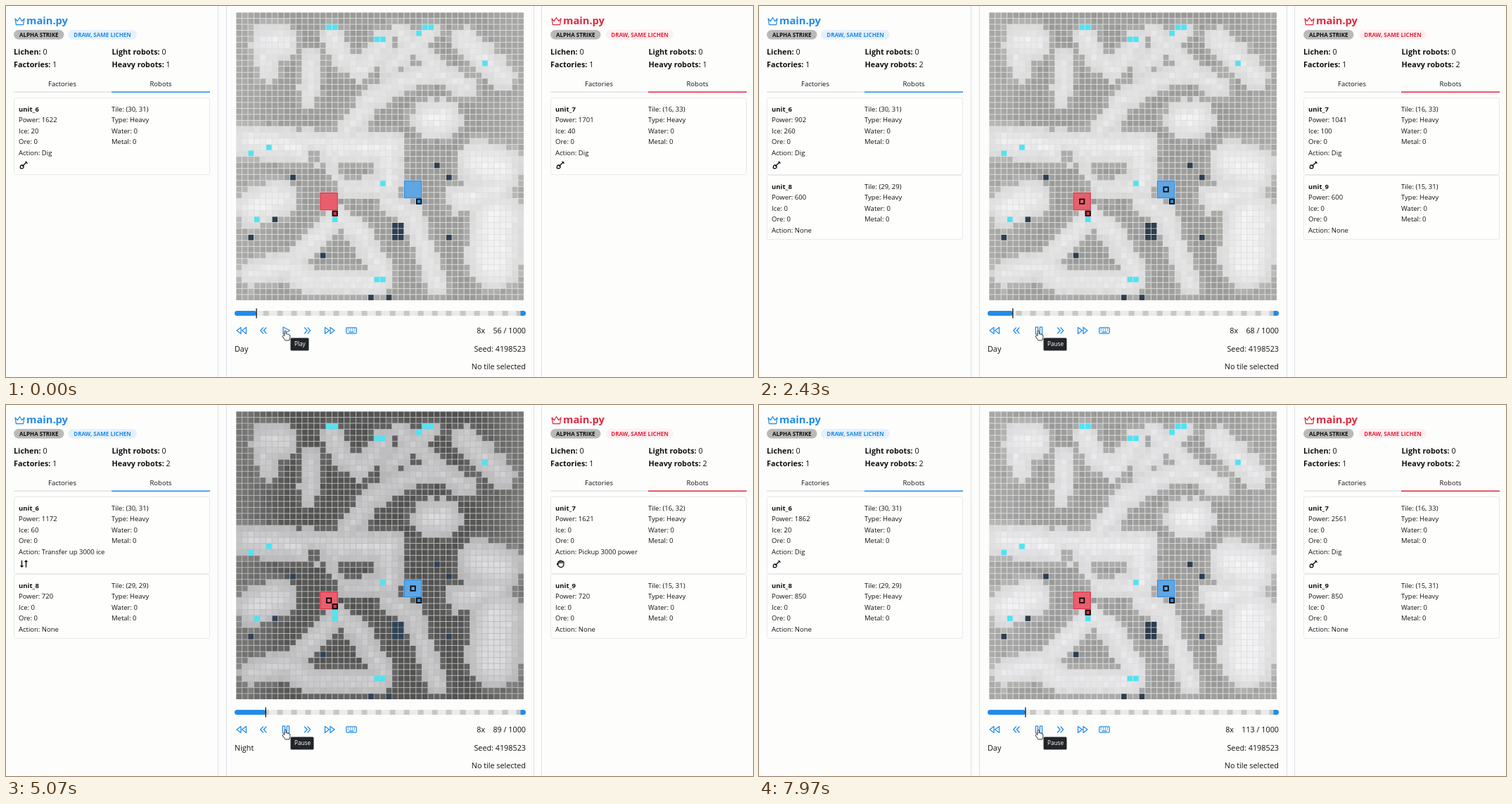
Animation, 1062 px wide and 527 px high, one loop 8000 ms. Source, as an HTML page with a canvas:

```html
<!DOCTYPE html>
<html lang="en">
<head>
<meta charset="utf-8">
<title>Match replay</title>
<style>
html, body { margin: 0; width: 100%; height: 100%; overflow: hidden; background: #fdfdfc; }
#stage { position: absolute; left: 0; top: 0; width: 1062px; height: 527px; overflow: hidden; }
#map, #ui { position: absolute; left: 0; top: 0; }
text { font-family: "Open Sans", "Noto Sans", sans-serif; fill: #111; white-space: pre; }
.t { font-size: 9.5px; }
.s { font-size: 10.8px; }
.b { font-weight: 700; }
.e { text-anchor: end; }
.m { text-anchor: middle; }
.i { fill: none; stroke-width: 1.25; stroke-linecap: round; stroke-linejoin: round; }
</style>
</head>
<body>
<div id="stage">
  <canvas id="map" width="1062" height="527"></canvas>
  <svg id="ui" width="1062" height="527" viewBox="0 0 1062 527"></svg>
</div>
<script>
const LOOP = 8000, START = 1054, STEP_MS = 123, FIRST = 56;
const N = 48, CELL = 8.53, TILE = 7.6, X0 = 327.4, Y0 = 9.4;
const BLUE = '#228be6', RED = '#e0283f';

const SWAP = 'M3 1.5 V10.5 M1.4 8.9 L3 10.5 L4.6 8.9 M9 10.5 V1.5 M7.4 3.1 L9 1.5 L10.6 3.1';
const ACTION = {
  dig: ['Dig', 'M4.2 7.8 L9.8 2.2 M8.4 1.6 L10.6 3.8 M1.2 7.6 Q3 5.6 4.8 7.2 Q6.6 9 4.6 10.8 Q2 11.6 1 11 Q.4 9.4 1.2 7.6Z'],
  down: ['Move down', 'M6 1.5 V10.5 M2.7 7.3 L6 10.5 L9.3 7.3'],
  north: ['Move up', 'M6 10.5 V1.5 M2.7 4.7 L6 1.5 L9.3 4.7'],
  up: ['Transfer up 3000 ice', SWAP],
  center: ['Transfer center 3000 ice', SWAP],
  pick: ['Pickup 3000 power', 'M2.5 6.5 V4 Q2.6 2.5 4 3 Q4.4 1.2 6 2 Q7.5 1.2 8.2 2.8 Q10 2.2 10.4 4 V7.2 Q10 11 6.5 11 Q4 11 2.7 8.8 L1 6.4 Q1.2 5 2.5 6.5 M4.2 3.2 V5 M6.2 2.3 V5 M8.3 3 V5']
};

// Orders: action, repeats, power gained per step
const dig = n => ['dig', n, -60], up = (n, gain = 0) => ['up', n, gain], pick = (n, gain) => ['pick', n, gain];
const north = ['north', 1, 0], down = ['down', 1, 0], center = ['center', 1, 0];

const SIDES = [
  {
    key: 'blue', dx: 0, color: BLUE, fill: '#5fa6e3', pale: '#e5f1fc', unit: 6, base: [29, 29], badge: [88, 98],
    start: { x: 30, y: 31, power: 1622, ice: 20 },
    orders: [dig(16), up(1, -50), north, pick(5, 218), down, dig(5), up(1, -50), dig(3), up(1, -50), dig(7),
      up(1, -50), dig(2), up(1, -50), north, pick(3, 400), center, pick(5, 48), down, dig(9)]
  },
  {
    key: 'red', dx: 763, color: RED, fill: '#e75f6d', pale: '#ffeef0', unit: 7, base: [15, 31], badge: [90, 96],
    start: { x: 16, y: 33, power: 1701, ice: 40 },
    orders: [dig(6), up(1), dig(7), up(2), dig(8), up(1), dig(2), north, up(1), pick(4, 325), pick(5, 86),
      north, up(4), up(2, 100), pick(4, 0), down, pick(5, 62), up(1), down, dig(9)]
  }
];

// Plays the orders once and lists the robot's state at each step
function simulate({ start, orders }) {
  const log = [];
  let u = { ...start };
  for (const [act, count, gain] of orders) {
    for (let i = 0; i < count; i++) {
      log.push({ ...u, act });
      u.power += gain;
      u.y += (act === 'down') - (act === 'north');
      u.ice = act === 'dig' ? u.ice + 20 : 0;
    }
  }
  return log;
}

const ui = document.getElementById('ui');
const put = html => ui.insertAdjacentHTML('beforeend', html);
const label = (x, y, s, cls = 't', more = '') => `<text x="${x}" y="${y}" class="${cls}" ${more}>${s}</text>`;
const slot = (x, y, id, cls = 't') => label(x, y, '', cls, `id="${id}"`);
const rect = (x, y, w, h, fill, more = '') => `<rect x="${x}" y="${y}" width="${w}" height="${h}" fill="${fill}" ${more}/>`;
const icon = (x, y, d, color, more = '') => `<path class="i" transform="translate(${x} ${y})" d="${d}" stroke="${color}" ${more}/>`;
const stat = (x, y, name, val) => label(x, y, `<tspan class="b">${name}:</tspan> ${val}`, 's');
const set = (id, s) => { const el = document.getElementById(id); if (el.textContent !== s) el.textContent = s; };
const show = (id, on) => document.getElementById(id).setAttribute('opacity', +on);

function card(k, n, y, name) {
  const rowY = i => y + 19.5 + i * 15.5;
  const left = ['power', 'ice', 'ore', 'act'].map((r, i) => slot(18, rowY(i + 1), k + n + r));
  const right = ['Type: Heavy', 'Water: 0', 'Metal: 0'].map((s, i) => label(150, rowY(i + 1), s));
  return rect(11.5, y + .5, 278, n ? 91 : 109, '#fefefd', 'rx="2.5" stroke="#e9eaec"') +
    label(18, rowY(0), name, 't b') + slot(150, rowY(0), k + n + 'tile') + left.join('') + right.join('');
}

function panel({ key, dx, color, pale, unit, badge: [bx, bw] }) {
  return `<g transform="translate(${dx} 0)">` +
    icon(12, 15, 'M1 3 L4.3 6.5 L7.5 1.5 L10.7 6.5 L14 3 L12.6 11.5 H2.4Z', color) +
    label(29, 26, 'main.py', 'b', `style="fill:${color};font-size:14.7px"`) +
    rect(11, 34, 71.5, 13.5, '#b9b9b9', 'rx="6.75"') +
    label(46.8, 43.8, 'ALPHA STRIKE', 'b m', 'font-size="8"') +
    rect(bx, 34, bw, 13.5, pale, 'rx="6.75"') +
    label(bx + bw / 2, 43.8, 'DRAW, SAME LICHEN', 'b m', `style="fill:${color};font-size:8px"`) +
    stat(11, 69, 'Lichen', 0) + stat(11, 86.5, 'Factories', 1) + stat(150.5, 69, 'Light robots', 0) +
    stat(150.5, 86.5, 'Heavy robots', `<tspan id="${key}heavy"></tspan>`) +
    label(80, 113.5, 'Factories', 't m') + label(220, 113.5, 'Robots', 't m') +
    rect(11, 121.5, 139, 1.3, '#dcdfe3') + rect(150, 121.5, 140, 1.5, color) +
    card(key, 0, 130, 'unit_' + unit) +
    icon(19.5, 219.5, '', '#000', `id="${key}icon"`) +
    `<g id="${key}extra">${card(key, 1, 240, 'unit_' + (unit + 2))}</g></g>`;
}

function controls() {
  const tri = 'M7 1.5 V10.5 L1 6Z M14.5 1.5 V10.5 L8.5 6Z';
  const chev = 'M4.5 2 L.8 6 L4.5 10 M9 2 L5.3 6 L9 10';
  const flip = (x, d) => `<path class="i" stroke="${BLUE}" transform="translate(${x} 455) scale(-1 1)" d="${d}"/>`;
  let keys = '';
  for (let i = 0; i < 4; i++) keys += `M${3.2 + i * 3} 3.8 h.4 M${3.2 + i * 3} 6 h.4 `;
  return icon(327, 455, tri, BLUE) + icon(361, 455, chev, BLUE) + flip(433.5, chev) + flip(468, tri) +
    icon(393, 455, 'M1 1 L10.5 6 L1 11Z', BLUE, 'id="play"') +
    icon(392.5, 455, 'M.8 1 H4 V11 H.8Z M6.8 1 H10 V11 H6.8Z', BLUE, 'id="pause"') +
    icon(483, 455, `M2 1.8 H14 Q15.2 1.8 15.2 3 V9 Q15.2 10.2 14 10.2 H2 Q.8 10.2 .8 9 V3 Q.8 1.8 2 1.8Z ${keys}M5 8.2 h6`, BLUE) +
    slot(739, 465, 'count', 's e') + slot(325, 491, 'phase', 's') +
    label(739, 491, 'Seed: 4198523', 's e') + label(739, 516, 'No tile selected', 's e');
}

const slideX = step => 333.6 + step * .4;

function slider() {
  let s = rect(325, 433, 414, 7, '#ebecea', 'rx="3.5"');
  for (let n = 30; n < 1000; n += 50) s += rect(slideX(n), 433, 8, 7, '#c6c8c5');
  return s + `<path d="M731.5 433 h4 a3.5 3.5 0 0 1 0 7 h-4z" fill="${BLUE}"/>` +
    rect(325, 433, 30, 7, BLUE, 'id="bar" rx="3.5"') + rect(355, 429.5, 1.3, 14, '#111', 'id="mark"');
}

put([301.5, 313.5, 750.5, 761.5].map(x => rect(x - .5, 0, 1, 527, '#dddeea')).join(''));
put(SIDES.map(panel).join('') + slider() + controls());
put('<path transform="translate(392 460)" fill="#fff" stroke="#333" stroke-width="1" stroke-linejoin="round" ' +
  'd="M4 8.5 V1.8 Q5 .2 6.2 1.8 V6 Q7.4 5 8.2 6.4 Q9.4 5.6 10 7 Q11.6 6.5 11.8 8.2 V11.5 L10.6 15 H5.2 L1.2 9.8 Q1 8 2.6 8Z"/>');
put('<g id="tip">' + rect(404.5, 471.5, 26, 18, '#212529', 'id="tipBox" rx="1.5"') +
  label(410, 483.3, '', '', 'id="tipText" style="fill:#fff;font-size:8.2px"') + '</g>');

// Pale ground as thick strokes: radius, then points in tile units
const PALE = [
  [3, 4.8, 4.5, 7, 4.5], [1.7, 4, 7, 5, 9.5], [1.7, 12, 7.5, 11.6, 13.5],
  [1.9, 15.6, 3, 17, 7, 20.5, 9, 24, 4.5], [1.5, 26.5, 2.5, 33, 8.5], [1.6, 32, 2.5, 25, 8.5],
  [1.8, 18, 19, 22, 14, 27, 11, 33, 9.2, 38, 12], [2.2, 37.5, 4, 44, 10], [3.2, 31.8, 17.2, 34, 17.2],
  [2.8, 1.5, 21, 12, 22, 25, 22], [2.2, 25, 22, 25, 28.5], [1.8, 16, 24, 18, 28.5, 23, 28.5],
  [3.4, 2.5, 32, 6.5, 30.5], [1.9, 10, 40, 16.5, 33.5, 20, 36, 24, 43], [2.2, 2, 43, 8, 41.5, 12, 44.5, 23, 44.5],
  [1.8, 25, 31, 29, 33.5, 33, 45], [3.8, 40, 24.5, 43.5, 25.5], [2.6, 43, 29, 37, 30.5], [4.6, 43, 34, 42.5, 41]
];
const ROUGH = [[.9, 12.6, 23.6, 13.2, 23.6], [1.5, 18, 26, 19.5, 26], [1.4, 8, 26.5, 10.5, 27.5]];
// Deposits: x, y, width, height
const ICE = [[15, 2, 2, 1], [23, 4, 2, 1], [31, 2, 2, 1], [30, 3, 1, 1], [41, 8, 1, 1], [5, 22, 1, 1], [2, 23, 1, 1],
  [24, 28, 1, 1], [3, 34, 1, 1], [16, 33, 1, 2], [30, 31, 1, 1], [23, 44, 2, 1]];
const ORE = [[9, 27, 1, 1], [6, 34, 1, 1], [2, 37, 1, 1], [14, 40, 1, 1], [33, 25, 1, 1], [35, 27, 1, 1],
  [35, 37, 1, 1], [22, 47, 1, 1], [25, 47, 1, 1], [26, 35, 2, 3]];

const clamp = (v, a = 0, b = 1) => Math.max(a, Math.min(b, v));
const hash = (x, y) => { const v = Math.sin(x * 127.1 + y * 311.7) * 43758.5453; return v - Math.floor(v); };

// How far a tile lies inside the nearest stroke
function depth(strokes, x, y) {
  let best = -9;
  for (const [r, ...p] of strokes) {
    for (let i = 0; i + 3 < p.length; i += 2) {
      const dx = p[i + 2] - p[i], dy = p[i + 3] - p[i + 1];
      const k = clamp(((x - p[i]) * dx + (y - p[i + 1]) * dy) / (dx * dx + dy * dy));
      best = Math.max(best, r - Math.hypot(x - p[i] - k * dx, y - p[i + 1] - k * dy));
    }
  }
  return best;
}

function shade(x, y, night) {
  const v = Math.min(depth(PALE, x, y), .2 - depth(ROUGH, x, y)) + (hash(x, y) - .5) * .5;
  const rim = clamp((Math.abs(x - 23.5) - 15) / 9);
  const base = v < 0
    ? (night ? 84 + 38 * rim : 156 + 14 * rim) + (v > -.7 ? 14 : 0)
    : (night ? 184 : 216) + clamp(v / 3) * (night ? 34 : 25);
  const g = Math.round(base + (hash(y + 7, x) - .5) * 7);
  return `rgb(${g},${g},${g + (v < 0 ? 0 : 3)})`;
}

function terrain(night) {
  const c = document.createElement('canvas');
  c.width = 1062; c.height = 527;
  const g = c.getContext('2d');
  const tile = (x, y, fill) => { g.fillStyle = fill; g.fillRect(X0 + x * CELL, Y0 + y * CELL, TILE, TILE); };
  const deposit = (list, fill) => {
    for (const [x, y, w, h] of list)
      for (let i = 0; i < w * h; i++) tile(x + i % w, y + Math.floor(i / w), fill);
  };
  g.fillStyle = night ? '#bcbcb6' : '#dfdfd9';
  g.fillRect(X0, Y0, N * CELL - .9, N * CELL - .9);
  for (let y = 0; y < N; y++) for (let x = 0; x < N; x++) tile(x, y, shade(x, y, night));
  deposit(ICE, '#4fe3f5');
  deposit(ORE, night ? '#2f4257' : '#2c3e50');
  return c;
}

const ground = [terrain(false), terrain(true)];
const logs = SIDES.map(simulate);
const ctx = document.getElementById('map').getContext('2d');

function box(x, y, size, fill, line, width, inset) {
  const px = X0 + x * CELL, py = Y0 + y * CELL;
  ctx.fillStyle = fill;
  ctx.fillRect(px, py, size, size);
  ctx.strokeStyle = line;
  ctx.lineWidth = width;
  ctx.strokeRect(px + inset, py + inset, size - 2 * inset, size - 2 * inset);
}
const robot = (x, y, fill) => box(x, y, TILE, fill, '#000', 1.7, .6);
const factory = (x, y, fill, line) => box(x - 1, y - 1, 24.6, fill, line, 1, .2);

function fillCard(id, u, text) {
  set(id + 'power', 'Power: ' + u.power);
  set(id + 'ice', 'Ice: ' + u.ice);
  set(id + 'ore', 'Ore: 0');
  set(id + 'act', 'Action: ' + text);
  set(id + 'tile', `Tile: (${u.x}, ${u.y})`);
}

function drawStep(step) {
  const night = step % 50 >= 30, pair = step > 58;
  const sunny = Math.min(step, 80) - 58 + Math.max(0, step - 100);
  ctx.clearRect(0, 0, 1062, 527);
  ctx.drawImage(ground[+night], 0, 0);
  SIDES.forEach(({ key, color, fill, base: [x, y] }, i) => {
    const u = logs[i][step - FIRST], [text, path] = ACTION[u.act];
    factory(x, y, fill, color);
    if (pair) robot(x, y, fill);
    robot(u.x, u.y, color);
    fillCard(key + 0, u, text);
    fillCard(key + 1, { x, y, power: 500 + 10 * sunny, ice: 0 }, 'None');
    document.getElementById(key + 'icon').setAttribute('d', path);
    set(key + 'heavy', pair ? '2' : '1');
    show(key + 'extra', pair);
  });
  document.getElementById('bar').setAttribute('width', slideX(step) - 325);
  document.getElementById('mark').setAttribute('x', slideX(step) - .6);
  set('count', `8x\u00a0\u00a0\u00a0\u00a0${step} / 1000`);
  set('phase', night ? 'Night' : 'Day');
}

let last = -1;
function frame() {
  const t = performance.now() % LOOP;
  const step = FIRST + Math.max(0, 1 + Math.floor((t - START) / STEP_MS));
  if (step !== last) drawStep(last = step);
  const playing = t >= 1000;
  show('play', !playing);
  show('pause', playing);
  set('tipText', playing ? 'Pause' : 'Play');
  document.getElementById('tipBox').setAttribute('width', playing ? 33 : 26);
  show('tip', t < 770 ? 1 : clamp((t - 1330) / 130));
  requestAnimationFrame(frame);
}
frame();
</script>
</body>
</html>
```
